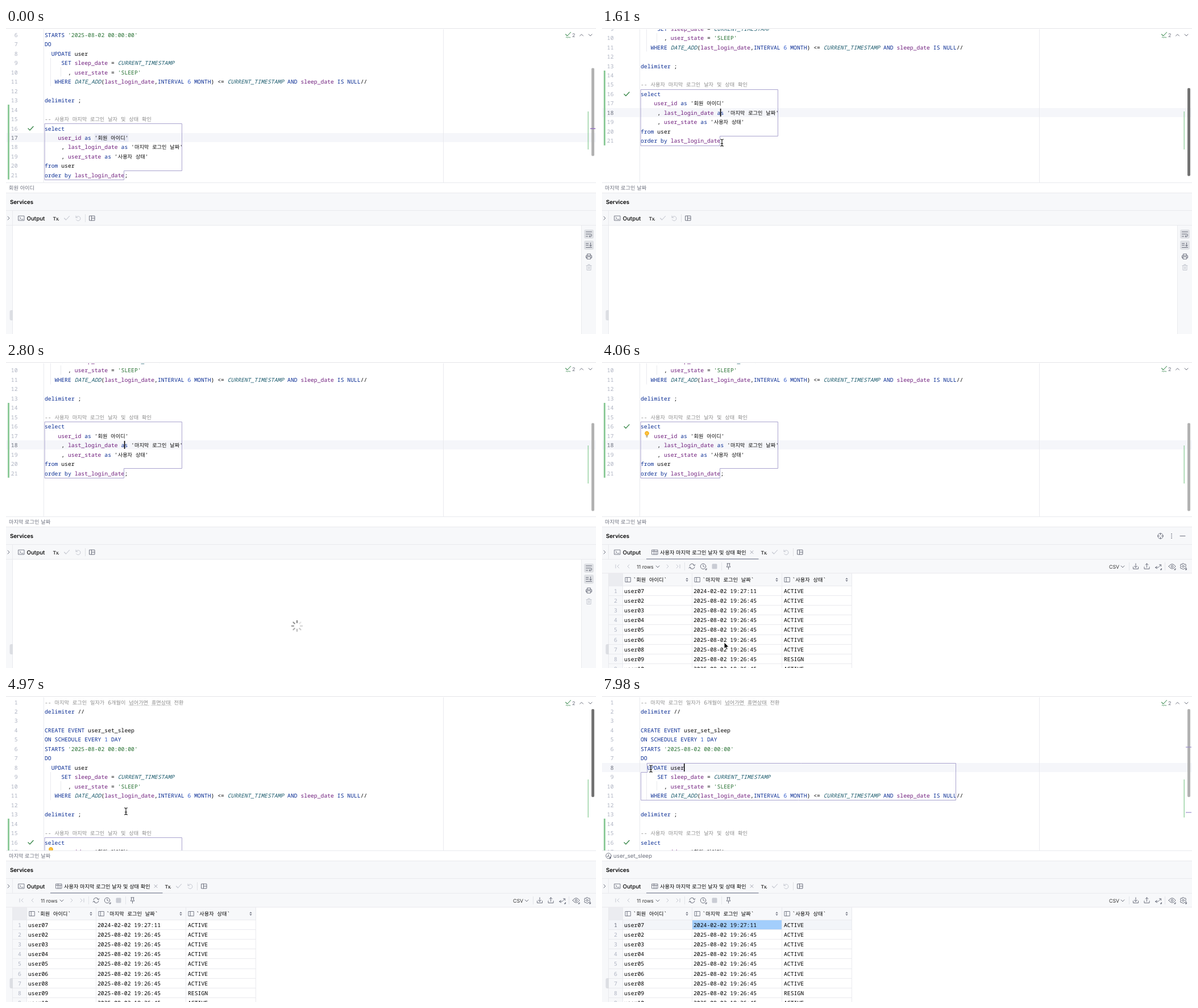
Animation of 1038 by 539 pixels, one loop 8000 ms. Source, as an HTML page with a canvas:

```html
<!DOCTYPE html>
<html lang="ko">
<head>
<meta charset="utf-8">
<title>SQL console</title>
<style>
html, body { margin: 0; width: 100%; height: 100%; overflow: hidden; background: #fff; }
canvas { display: block; }
</style>
</head>
<body>
<canvas id="stage" width="1038" height="539"></canvas>
<script>
const g = document.getElementById('stage').getContext('2d');
g.textRendering = 'geometricPrecision';

const UI = 'Inter, "Open Sans", sans-serif';
const MONO = '"Noto Sans Mono", "DejaVu Sans Mono", monospace';
const KO = '"Noto Sans CJK KR", "Noto Sans CJK", sans-serif';
const CH = 5.85, LINE = 16.47, LEFT = 68;
const PANEL = '#f7f8fa', BORDER = '#e9eaee', ICON = '#6c707e', FAINT = '#c4c7d0', KEYWORD = '#0a2d94', PURPLE = '#aaa4cf';

const code = `-- 마지막 로그인 일자가 6개월이 넘어가면 휴면상태 전환
delimiter //

CREATE EVENT user_set_sleep
ON SCHEDULE EVERY 1 DAY
STARTS '2025-08-02 00:00:00'
DO
  UPDATE user
     SET sleep_date = CURRENT_TIMESTAMP
       , user_state = 'SLEEP'
   WHERE DATE_ADD(last_login_date,INTERVAL 6 MONTH) <= CURRENT_TIMESTAMP AND sleep_date IS NULL//

delimiter ;

-- 사용자 마지막 로그인 날자 및 상태 확인
select
    user_id as '회원 아이디'
     , last_login_date as '마지막 로그인 날짜'
     , user_state as '사용자 상태'
from user
order by last_login_date;`.split('\n');

const rules = [
  [/^--/, '#8c8c8c'],
  [/^'[\dA-Z]/, '#2a7335'],
  [/^(CURRENT_TIMESTAMP|DATE_ADD)$/, '#1d5c6e', 'italic'],
  [/^(sleep_date|user_state|last_login_date|user_id)$/, '#6f1d7c'],
  [/^\d+$/, '#2c56c8'],
  [/^([A-Z]+|delimiter|select|as|from|order|by)$/, KEYWORD]
];

// Generic drawing helpers
function rect(x, y, w, h, color) {
  g.fillStyle = color;
  g.fillRect(x, y, w, h);
}
function round(x, y, w, h, r, color) {
  g.fillStyle = color;
  g.beginPath();
  g.roundRect(x, y, w, h, r);
  g.fill();
}
function path(x, y, d, color = ICON, width = 1, fill) {
  const shape = new Path2D(d);
  g.save();
  g.translate(x, y);
  g.lineJoin = g.lineCap = 'round';
  if (fill) { g.fillStyle = fill; g.fill(shape); }
  g.strokeStyle = color;
  g.lineWidth = width;
  g.stroke(shape);
  g.restore();
}
function text(s, x, y, color = '#000', { size = 9.75, face = UI, style = '' } = {}) {
  g.fillStyle = color;
  for (const run of s.match(/[가-힣]+|[^가-힣]+/g) || []) {
    const korean = run[0] >= '가';
    g.font = `${korean ? '' : style} ${korean ? size * .943 : size}px ${korean ? KO : face}`;
    g.fillText(run, x, y + 3.5);
    x += face === MONO && !korean ? run.length * CH : g.measureText(run).width;
  }
  return x;
}
const mono = (s, x, y, color, style = '') => text(s, x, y, color, { face: MONO, style: style + ' 500' });

// Keys are [time, ...values], linear between neighbours
function track(t, keys) {
  const i = keys.findIndex(k => k[0] > t);
  if (i === 0) return keys[0].slice(1);
  if (i < 0) return keys.at(-1).slice(1);
  const a = keys[i - 1], b = keys[i], u = (t - a[0]) / (b[0] - a[0]);
  return a.slice(1).map((v, n) => v + (b[n + 1] - v) * u);
}

const scrollKeys = [[980, 81], [1190, 94.5], [1470, 136], [1680, 144.4], [4410, 144.4], [4690, 67.5], [4830, 24], [4970, 0]];
const mouseKeys = [[0, 300, 530], [210, 280, 440], [420, 230, 240], [560, 211, 203], [770, 211, 202],
  [3850, 211, 202], [4060, 215, 500], [4200, 215, 500], [4410, 211, 203], [5250, 211, 203], [5600, 205, 300],
  [5880, 220, 400], [6440, 220, 400], [6650, 218, 260], [6860, 205, 127], [7350, 200, 127], [7840, 90, 128], [7980, 86, 128]];
const between = (t, a, b) => t >= a && t < b;

const chevron = { left: 'M2 -3L-1 0L2 3', right: 'M-1 -3L2 0L-1 3', down: 'M-3 -1L0 2L3 -1', up: 'M-3 2L0 -1L3 2' };
const check = 'M-4.5 0L-1.5 3L4.5 -3.5';
const circle = r => `M${r} 0A${r} ${r} 0 1 1 ${-r} 0A${r} ${r} 0 1 1 ${r} 0`;

// Lines are snapped to the pixel grid
function outline(points, color) {
  path(0, 0, 'M' + points.map(p => p.map(v => Math.floor(v) + .5).join(' ')).join('L') + 'Z', color);
}

function codeLine(s, y) {
  let x = LEFT;
  for (const token of s.match(/^--.*|'[^']*'|\w+|\s+|[^\w\s']/g) || []) {
    const [, color, style] = rules.find(r => r[0].test(token)) || [0, '#080808'];
    x = mono(token, x, y, color, style);
  }
}

function editor(t) {
  const [scroll] = track(t, scrollKeys);
  const lineY = n => 11 + (n - 1) * LINE - scroll;
  const top = n => Math.floor(lineY(n) - LINE / 2);
  const current = t < 560 ? 17 : t < 6930 ? 18 : 8;
  const selected = between(t, 2100, 2520);
  const scrolling = between(t, 1050, 2520) || between(t, 4410, 6020);

  g.save();
  g.beginPath();
  g.rect(0, 2, 1038, 270);
  g.clip();
  rect(0, top(current), 1038, 16, '#f5f6fa');
  if (selected) {
    rect(LEFT, top(16), 970, top(21) - top(16), '#c9c9ff');
    rect(LEFT, top(21), 140, 17, '#c9c9ff');
  }
  if (current === 17) rect(155.5, top(17) + 1, 60, 15, '#e8eaf5');
  if (current === 8) rect(120.5, top(8) + 1, 24, 15, '#ebe9f7');
  rect(66, 0, 1, 272, BORDER);
  rect(769, 0, 1, 272, BORDER);
  rect(78, top(9), 1, LINE * 3, BORDER);
  rect(96, top(10), 1, LINE, BORDER);
  rect(3, top(14), 3, LINE * 8, '#8fcb9b');

  code.forEach((s, i) => {
    const n = i + 1, y = lineY(n), label = String(n);
    mono(label, 20.5 - label.length * CH, y, n === current ? '#686d7c' : '#aeb3c2');
    codeLine(s, y);
  });
  for (const x of [216, 255]) {
    path(x, lineY(1) + 5.5, 'M0 0' + 'q1 -1.2 2 0t2 0'.repeat(9), '#bcbcbc', .7);
  }
  if (!between(t, 2590, 2940)) path(43.5, lineY(16), check, '#3c8a4c', 1.4);

  if (t < 7700) {
    outline([[68, top(16)], [309, top(16)], [309, top(21)], [207, top(21)], [207, top(22)], [68, top(22)]],
      between(t, 6020, 6930) ? '#a9abb3' : PURPLE);
  } else {
    outline([[79, top(8)], [622, top(8)], [622, top(12)], [68, top(12)], [68, top(9)], [79, top(9)]], PURPLE);
  }
  if (between(t, 3640, 6930)) {
    const y = lineY(17) - 3;
    path(79, y - 1.5, circle(3.3), '#eda200', 1, '#ffc342');
    path(79, y + 4, 'M-1.5 -1H1.5M-1 1H1', '#8a7a50');
  }
  if (between(t, 560, 2100) || between(t, 2520, 3220)) rect(207.8, top(18) + 1, 1.6, 14, '#000');
  if (t >= 6930) rect(144, top(8) + 1, 1.5, 14, '#000');

  path(989, 11, check, '#4d9560', 1.1);
  path(985, 16.5, 'M0 0q1 -1.5 2 0t2 0t2 0t2 0', '#4d9560', .9);
  text('2', 996, 12.5, ICON, { size: 9 });
  path(1012.5, 12, chevron.up);
  path(1028, 12, chevron.down);

  rect(1023.5, 147, 1.5, 67, '#9bd3a6');
  if (selected) rect(1027, 167, 10, 47, '#8c87c8');
  round(1030, 23 + scroll * .585, 5, 155, 2, scrolling ? '#737373' : '#b2b2b2');
  if (t < 560) rect(1028, 176.5, 9, 1.5, '#9470c0');
  if (t >= 7280) for (const y of [89, 204]) rect(1027, y + .5, 10, 1.2, '#9c8fcb');
  g.restore();
  rect(0, 0, 1038, 1, '#e3e4e8');
}

function breadcrumb(t) {
  rect(0, 272, 1038, 1, BORDER);
  if (t < 7000) {
    text(t < 910 ? '회원 아이디' : '마지막 로그인 날짜', 5, 281.5, ICON);
  } else {
    path(11.5, 281.5, circle(4.7) + 'M0 -2V1H-2.5', ICON);
    path(14, 284, 'M0 -1L2 1L0 3Z', ICON, .8, ICON);
    text('user_set_sleep', 20, 281.5, ICON);
  }
}

function tableIcon(x, y) {
  path(x, y, 'M-5 -4H5V4H-5ZM-5 -1.5H5M-1.5 -4V4M2 -1.5V4', ICON, .9);
}

function toolWindow(t, hasTable, hover) {
  rect(0, 291, 1038, 57, PANEL);
  for (const y of [290, 321, 347]) rect(0, y, 1038, 1, BORDER);
  text('Services', 7, 306.5, '#000', { style: '600' });
  if (hover) {
    path(982.5, 306.5, circle(4.7) + 'M0 -5V-2M0 5V2M-5 0H-2M5 0H2');
    for (const y of [303, 306.5, 310]) rect(1001.3, y - .8, 1.6, 1.6, ICON);
    path(1021.5, 306.5, 'M-4.5 0H4.5');
  }
  path(4, 335, chevron.right);
  rect(11, 322, 1, 26, BORDER);
  path(27, 335, 'M-5 -4H5V4H-5ZM-3 -2L-1 0L-3 2M0 2H3', ICON, .9);
  text('Output', 36.5, 335, '#000', { style: '500' });

  const dx = hasTable ? 197 : 0;
  if (hasTable) {
    tableIcon(93, 335);
    text('사용자 마지막 로그인 날자 및 상태 확인', 102, 335);
    path(263.5, 335, 'M-2.5 -2.5L2.5 2.5M2.5 -2.5L-2.5 2.5', '#9a9daa', .9);
    rect(78, 346, 197.5, 2, between(t, 6020, 6930) ? '#3574f0' : '#a9adba');
  }
  text('Tx', 82.5 + dx, 335, '#333', { size: 8.5, style: '600' });
  path(92 + dx, 338, 'M-1 0L0 1L1 0', '#333', .9);
  path(107 + dx, 335, check, FAINT, 1.1);
  path(126.5 + dx, 335, 'M-3.5 -4V-1H-.5M-3.3 -1A4 4 0 1 1 -3 2.7', FAINT);
  rect(139 + dx, 328, 1, 14, '#dfe1e5');
  path(151.5 + dx, 335, 'M-4.5 -4H4.5V4H-4.5ZM-1 -4V4M-1 0H4.5', ICON);

  rect(0, 348, 12, 191, PANEL);
  rect(11, 348, 1, 191, BORDER);
  round(6.5, 497, 5.5, 18, [3, 0, 0, 3], '#dcdee3');
}

function outputStrip() {
  rect(1013, 348, 25, 191, PANEL);
  rect(1012, 348, 1, 191, BORDER);
  round(1017, 355, 17, 16, 3, '#dfe1e5');
  round(1017, 374.5, 17, 16, 3, '#dfe1e5');
  path(1025.5, 363, 'M-5 -4H5M-5 0H3A2 2 0 0 1 3 4H1M2 2.5L.5 4L2 5.5M-5 4H-2');
  path(1025.5, 382.5, 'M-5 -3H-1M-5 0H-1M-5 4H5M3 -4V2M1 0L3 2L5 0');
  path(1025.5, 402, 'M-3 -1V-4H3V-1M-3 3H-5V-1H5V3H3M-3 1H3V5H-3Z');
  path(1025.5, 421.5, 'M-4.5 -3H4.5M-1.5 -3V-5H1.5V-3M-3.5 -3V5H3.5V-3M-1 -1V3M1 -1V3', FAINT);
}

function resultToolbar() {
  rect(0, 348, 1038, 24, PANEL);
  path(27, 360, 'M-3 -3V3M3 -3L0 0L3 3', FAINT);
  path(46, 360, chevron.left, FAINT);
  text('11 rows', 61, 360, '#333', { size: 8.8 });
  path(98, 360, chevron.down);
  path(115, 360, chevron.right, FAINT);
  path(134, 360, 'M3 -3V3M-3 -3L0 0L-3 3', FAINT);
  rect(145, 353, 1, 14, '#e3e5e9');
  path(158.5, 360, 'M-4.5 -1A4.5 4.5 0 0 1 4 -2M5.5 -3L4 -1L2 -2.5M4.5 1A4.5 4.5 0 0 1 -4 2M-5.5 3L-4 1L-2 2.5');
  path(178, 360, circle(4.7) + 'M0 -2.5V0L2 1M6 4V6H4Z');
  round(193.5, 355.5, 9, 9, 1.5, '#c9ccd4');
  rect(210, 353, 1, 14, '#e3e5e9');
  path(222.5, 359, 'M-2.5 -4H2.5M-2 -4V0L-3.5 2H3.5L2 0V-4M0 2V6');
  text('CSV', 892, 360, '#333', { size: 8.8 });
  path(916, 360, chevron.down);
  rect(927, 353, 1, 14, '#e3e5e9');
  path(939, 360, 'M0 -5V2M-2.5 -.5L0 2L2.5 -.5M-4.5 1V4.5H4.5V1');
  path(958.5, 360, 'M0 2V-5M-2.5 -2.5L0 -5L2.5 -2.5M-4.5 1V4.5H4.5V1');
  path(978.5, 360, 'M-5 2H0L5 -3M2 -3H5V0M-2 0L-5 2L-2 4M6 4V6H4Z');
  rect(990, 353, 1, 14, '#e3e5e9');
  path(1003, 360, 'M-6 0Q0 -8.5 6 0Q0 8.5 -6 0' + circle(1.8) + 'M6 4V6H4Z');
  path(1022.5, 360, 'M-1 -5H1L2 -3.5L4 -4L5 -2L4 0L5 2L4 4L2 3.5L1 5H-1L-2 3.5L-4 4L-5 2L-4 0L-5 -2L-4 -4L-2 -3.5Z' + circle(1.7) + 'M6 4V6H4Z');
}

function grid(t) {
  const PITCH = 17.2, columns = [36, 158, 316, 439];
  rect(12, 372, 427, 22, PANEL);
  rect(12, 372, 24, 167, PANEL);
  rect(12, 372, 24, 22, '#ebecf0');
  if (t >= 6020) {
    rect(12, 394, 427, 17, '#f3f5f9');
    rect(158.5, 394, 158, 17.5, '#a3cefc');
  }
  rect(0, 371.5, 1038, 1, BORDER);
  for (const x of columns) rect(x, 372, 1, 167, BORDER);
  ['`회원 아이디`', '`마지막 로그인 날짜`', '`사용자 상태`'].forEach((title, i) => {
    const x = columns[i];
    path(x + 9.8, 383.5, 'M-4.5 -4H4.5V4H-4.5ZM-1.5 -4V4', ICON, .9);
    mono(title, x + 18.5, 383.5, '#000');
    const right = columns[i + 1] - 8.5;
    path(right, 383.5, 'M-1.5 -1.3L0 -3L1.5 -1.3ZM-1.5 1.3L0 3L1.5 1.3Z', ICON, .5, ICON);
  });
  ['07', '02', '03', '04', '05', '06', '08', '09', '10'].forEach((id, i) => {
    const y = 403 + i * PITCH;
    rect(12, Math.floor(y - 9), 427, 1, BORDER);
    mono(String(i + 1), 21, y, i === 0 && t >= 6020 ? '#686d7c' : '#aeb3c2');
    mono('user' + id, 39, y);
    mono(i ? '2025-08-02 19:26:45' : '2024-02-02 19:27:11', 161, y);
    mono(id === '09' ? 'RESIGN' : 'ACTIVE', 320, y);
  });
}

function spinner(t) {
  const lead = Math.floor((t - 2800) / 70);
  for (let i = 0; i < 8; i++) {
    const a = i * Math.PI / 4 - Math.PI / 2, age = ((lead - i) % 8 + 8) % 8;
    const c = Math.cos(a), s = Math.sin(a);
    path(512, 465, `M${c * 6} ${s * 6}L${c * 9.2} ${s * 9.2}`, `rgba(90,90,90,${.72 - age * .08})`, 2.3);
  }
}

function popup() {
  round(202, 149, 323, 99, 12, 'rgba(60,60,110,.10)');
  g.save();
  g.shadowColor = 'rgba(0,0,0,.35)';
  g.shadowBlur = 8;
  g.shadowOffsetY = 2;
  round(208, 154, 310.5, 85.5, 6, '#fff');
  g.restore();
  g.textAlign = 'center';
  text('Statements', 365, 169.5, '#000', { style: '600' });
  g.textAlign = 'left';
  rect(208, 184, 310.5, 17.5, '#d3e1fc');
  text("select user_id as '회원 아이디' , last_login_date as '마...", 209, 192.5);
  text('-- 마지막 로그인 일자가 6개월이 넘어가면 휴면상태 전환 delimiter // CREA...', 209, 211);
  round(208, 225, 310.5, 14.5, [0, 0, 6, 6], PANEL);
  text('Customize', 210.5, 232.5, '#315fbd');
}

function pointer(x, y) {
  if (y < 272) {
    const beam = 'M-2.5 -6Q0 -6 0 -4Q0 -6 2.5 -6M0 -4V4M-2.5 6Q0 6 0 4Q0 6 2.5 6M-1.5 1.5H1.5';
    path(x, y, beam, '#fff', 2.4);
    path(x, y, beam, '#111', 1.1);
  } else {
    path(x, y - 6, 'M0 0V11L2.6 8.6L4.4 12.6L6.2 11.8L4.5 8H8Z', '#fff', 1, '#000');
  }
}

function draw(now) {
  const t = Math.floor(now % 8000 / 70) * 70;
  const hasTable = t >= 2870;
  const mouseShown = between(t, 70, 2100) || t >= 3850;
  const [x, y] = track(t, mouseKeys);
  rect(0, 0, 1038, 539, '#fff');
  editor(t);
  breadcrumb(t);
  toolWindow(t, hasTable, mouseShown && y > 291);
  if (hasTable) {
    resultToolbar();
    grid(t);
  } else outputStrip();
  if (between(t, 2590, 2940)) spinner(t);
  if (between(t, 2100, 2520)) popup();
  if (mouseShown) pointer(x, y);
  requestAnimationFrame(draw);
}
requestAnimationFrame(draw);
</script>
</body>
</html>
```
